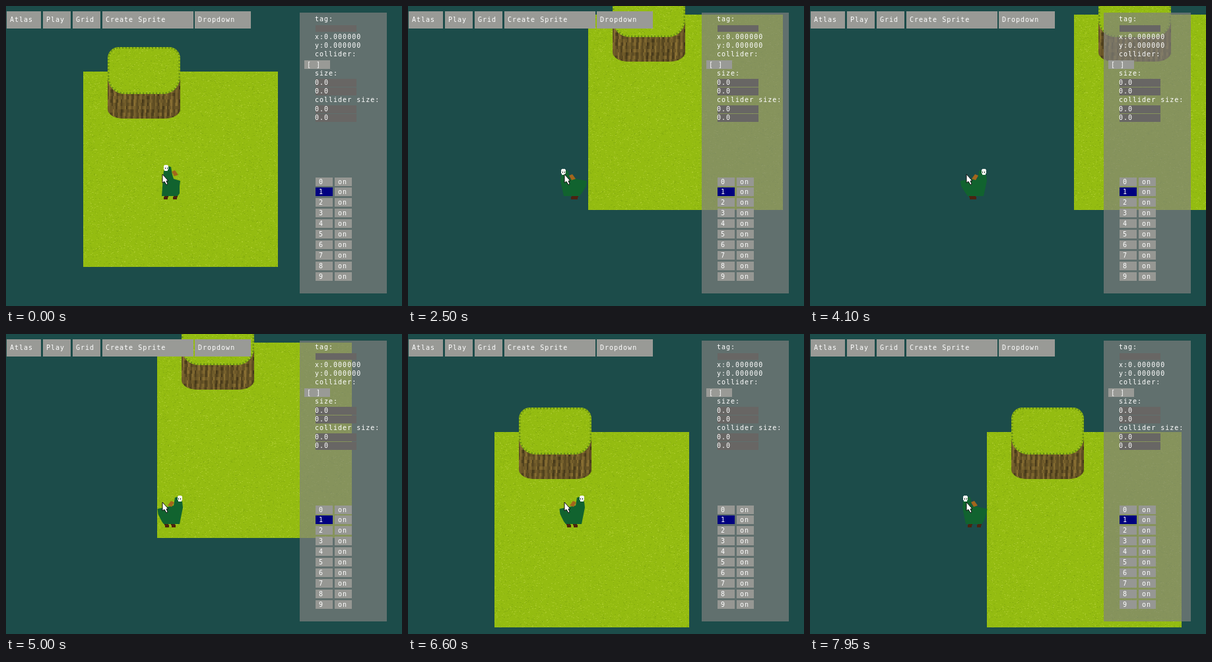
An HTML page with a canvas for the animation above (8000 ms loop, 600 by 453 pixels).

```html
<!DOCTYPE html>
<html lang="en">
<head>
<meta charset="utf-8">
<title>Sprite editor</title>
<style>
  html, body { margin: 0; width: 100%; height: 100%; overflow: hidden; background: #1c4c4a; }
  canvas { display: block; }
</style>
</head>
<body>
<canvas id="stage" width="600" height="453"></canvas>
<script>
const ctx = document.getElementById('stage').getContext('2d');
const LOOP = 8000, STEP = 50;
const SPEED = 0.19; // px per ms
const SIZE = 295, RISE = 37;
const GRASS = ['#86ae0f', '#a0c51c', '#8cb411', '#a8c92a'];

// The ground scrolls at a constant speed: [start ms, dx, dy]
const MOVES = [
  [500, 73, 0], [1400, 68, 0], [1850, 0, -86], [2420, 230, 0], [3636, -310, 0],
  [5328, 0, 135], [6200, 10, 0], [6300, -111, 0], [6947, 200, 0]
];

let seed = 7;
function random() {
  seed = (seed * 16807) % 2147483647;
  return seed / 2147483647;
}

function rect(c, color, x, y, w, h) {
  c.fillStyle = color;
  c.fillRect(x, y, w, h);
}

function poly(color, points) {
  ctx.fillStyle = color;
  ctx.beginPath();
  for (let i = 0; i < points.length; i += 2) ctx.lineTo(points[i], points[i + 1]);
  ctx.fill();
}

function grass(c, x, y, w, h) {
  rect(c, '#94bc11', x, y, w, h);
  for (let i = 0; i < w * h / 10; i++) {
    const color = GRASS[Math.floor(random() * GRASS.length)];
    rect(c, color, x + Math.floor(random() * w), y + Math.floor(random() * h), 1 + Math.floor(random() * 2), 1);
  }
}

function clipRound(c, x, y, w, h, radii) {
  c.save();
  c.beginPath();
  c.roundRect(x, y, w, h, radii);
  c.clip();
}

function makeGround() {
  const canvas = document.createElement('canvas');
  canvas.width = SIZE;
  canvas.height = SIZE + RISE;
  const c = canvas.getContext('2d');
  grass(c, 0, RISE, SIZE, SIZE);

  // Bark: vertical ribs with a little noise
  const foot = { x: 24, y: 14 };
  clipRound(c, 37, 14, 110, 94, [10, 10, foot, foot]);
  for (let x = 37; x < 147; x += 2) {
    for (let y = 14; y < 108; y += 5) {
      const light = 28 + 6 * Math.sin(x * 0.8 + y * 0.03) + 10 * (random() - 0.5);
      rect(c, `hsl(42 46% ${light}%)`, x, y, 2, 5);
    }
  }
  c.restore();

  // Grass cap with a ragged rim
  clipRound(c, 37, 0, 110, 71, [17, 17, 26, 26]);
  grass(c, 37, 0, 110, 71);
  c.lineWidth = 5;
  c.strokeStyle = '#638a17';
  c.setLineDash([2, 3]);
  c.stroke();
  c.restore();
  return canvas;
}

const ground = makeGround();

function drawHero(t, moving, right) {
  const gap = moving ? [2, 2, 5, 7][Math.floor(t / 100) % 4] : 7;
  const x = moving ? 232 : 239;
  const y = moving ? (gap < 3 ? 246 : 244) : 240;
  const tail = moving ? 272 - gap / 2 : 264;

  ctx.save();
  if (right) {
    ctx.translate(499, 0);
    ctx.scale(-1, 1);
  }
  for (const side of [-1, 1]) {
    const footX = Math.round(250 - gap * 0.6 + side * gap);
    rect(ctx, '#4c2310', footX + 1, 284, 6, 5);
    rect(ctx, '#4c2310', footX, 288, 6, 4);
  }
  poly('#11632f', [
    x, y + 9, x + 7, y + 2, x + 11, y + 3, x + 13, y + 15, 254, 261, tail, 264,
    tail - 1, 272, 263, 283, 260, 287, 236, 287, x - 1, y + 18
  ]);
  const bagX = x + 12, bagY = y + 10;
  poly('#a3661c', [bagX, bagY, bagX + 5, bagY - 2, bagX + 10, bagY + 5, bagX + 4, bagY + 7]);

  rect(ctx, '#f4f6f2', x, y + 1, 7, 6);
  rect(ctx, '#f4f6f2', x + 1, y, 5, 9);
  for (const eye of [2, 5]) rect(ctx, '#26352f', x + eye, y + 4, 1, 2);
  ctx.restore();
}

function text(value, x, y) {
  ctx.fillStyle = '#fff';
  ctx.fillText(value, x, y + 0.5);
}

function button(label, x, y, w, h, color = '#999a96', pad = 5) {
  rect(ctx, color, x, y, w, h);
  text(label, x + pad, y + h / 2);
}

function drawInterface() {
  ctx.font = '10px "DejaVu Sans Mono", monospace';
  ctx.letterSpacing = '1px';
  ctx.textBaseline = 'middle';
  button('Atlas', 1, 8, 52, 26);
  button('Play', 56, 8, 42, 26);
  button('Grid', 101, 8, 42, 26);
  button('Create Sprite', 146, 8, 138, 26);
  button('Dropdown', 286, 8, 85, 26);

  rect(ctx, 'rgba(128,130,127,.69)', 445, 10, 132, 424);
  const labels = { 'tag:': 20, 'x:0.000000': 47, 'y:0.000000': 60, 'collider:': 73, 'size:': 102, 'collider size:': 142 };
  for (const label in labels) text(label, 468, labels[label]);
  button('', 469, 29, 62, 10, '#686664');
  button('[ ]', 452, 82, 39, 13, '#999a96', 4);
  for (const y of [110, 123, 150, 163]) button('0.0', 469, y, 62, 12, '#686664', -1);
  for (let i = 0; i < 10; i++) {
    const y = Math.round(258.5 + i * 15.9);
    button(String(i), 469, y, 26, 13, i === 1 ? '#000080' : '#969793');
    button('on', 498, y, 26, 13, '#969793');
  }
}

function drawPointer() {
  const arrow = [237, 254, 237, 267, 240, 265, 243, 270, 245, 269, 243, 264, 246, 264];
  poly('#fff', arrow);
  ctx.strokeStyle = '#111';
  ctx.lineWidth = 1;
  ctx.closePath();
  ctx.stroke();
}

function draw(t) {
  let x = 117, y = 99, moving = false, right = false;
  for (const [start, dx, dy] of MOVES) {
    if (t < start) break;
    const done = (t - start) * SPEED / Math.abs(dx + dy);
    moving = done < 1;
    x += dx * Math.min(done, 1);
    y += dy * Math.min(done, 1);
    if (dx) right = dx < 0;
  }
  rect(ctx, '#1c4c4a', 0, 0, 600, 453);
  ctx.drawImage(ground, Math.round(x), Math.round(y) - RISE);
  drawHero(t, moving, right);
  drawInterface();
  drawPointer();
}

function tick() {
  draw(Math.floor(performance.now() % LOOP / STEP) * STEP);
  requestAnimationFrame(tick);
}
tick();
</script>
</body>
</html>
```
